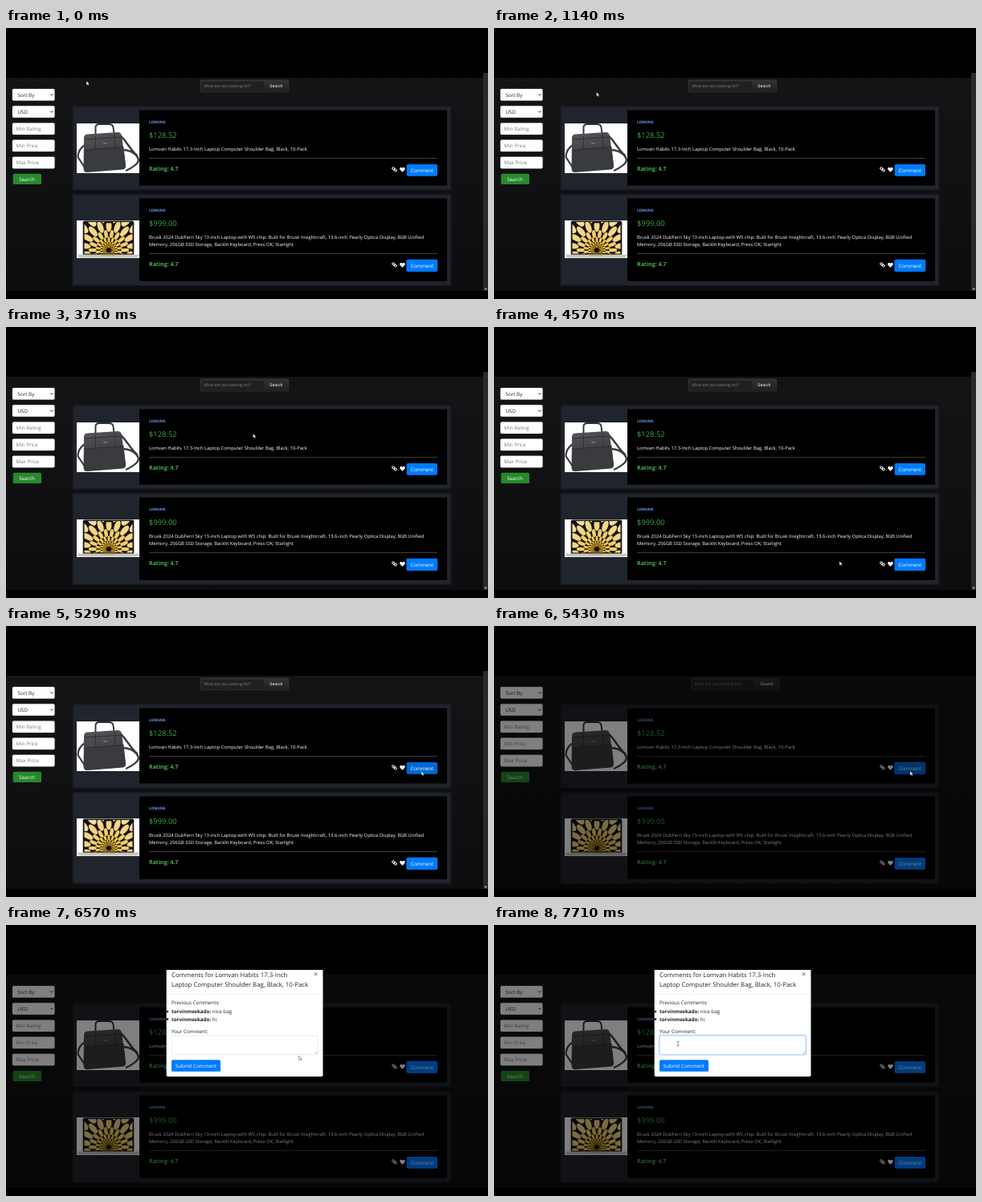
Write an HTML page that moves like this. It is 600 px wide and 338 px high and loops after 8000 ms.

```html
<!DOCTYPE html>
<html lang="en">
<head>
<meta charset="utf-8">
<title>Product comments</title>
<style>
html, body { margin: 0; width: 100%; height: 100%; overflow: hidden; background: #000; }
svg { display: block; width: 100vw; height: 100vh; }
text { font: 6.25px "Open Sans", "Noto Sans", sans-serif; fill: #fff; white-space: pre; text-rendering: geometricPrecision; }
.b { font-weight: 700; }
.brand { font-size: 4.69px; font-weight: 700; fill: #6b9bf2; }
.price { font-size: 9.375px; fill: #3fa845; }
.desc { font-size: 5.86px; }
.rate { font-size: 7.03px; font-weight: 700; fill: #4caf50; }
.bar { font: 5.2px "Liberation Sans", Arial, sans-serif; }
.hint { fill: #757b82; }
.ink, #modal text { fill: #212529; }
#modal text.w { fill: #fff; }
#modal .title { font-size: 7.81px; }
</style>
</head>
<body>
<svg viewBox="0 0 600 338" preserveAspectRatio="none">
  <defs>
    <linearGradient id="page" x2="0" y2="1"><stop stop-color="#141416"/><stop offset="1" stop-color="#0d0d0f"/></linearGradient>
    <linearGradient id="tool" x2="0" y2="1"><stop stop-color="#333"/><stop offset="1" stop-color="#1f1f1f"/></linearGradient>
    <linearGradient id="cloth" x2=".3" y2="1"><stop stop-color="#55565a"/><stop offset="1" stop-color="#343538"/></linearGradient>
    <clipPath id="view"><rect y="56" width="600" height="272"/></clipPath>
    <clipPath id="screen"><rect x="97.5" y="242" width="60" height="39.5"/></clipPath>
  </defs>
  <rect width="600" height="338"/>
  <rect y="62" width="600" height="266" fill="url(#page)"/>
  <g id="search">
    <rect x="242" y="64.8" width="110" height="15.2" rx="1.5" fill="url(#tool)" stroke="#3b3b3b" stroke-width=".5"/>
    <rect x="244" y="66.7" width="77" height="11.4" fill="#202020"/>
    <text class="bar" x="246" y="74.2" fill-opacity=".42">What are you looking for?</text>
    <text class="bar" x="328" y="74.4">Search</text>
  </g>
  <g id="side"></g>
  <g id="cards"></g>
  <g id="scroll">
    <rect x="594" y="56" width="6" height="272" fill="#2a2a2b"/>
    <path d="M595.2 324.6h3.8l-1.9 2.4z" fill="#aaa"/>
  </g>
  <rect id="shade" y="56" width="600" height="272" opacity="0"/>
  <g clip-path="url(#view)"><g id="modal"></g></g>
  <path id="arrow" d="M0 0V5.3L1.3 4.2 2.2 6.1 3.1 5.7 2.3 3.9H3.9Z" fill="#fff" stroke="#000" stroke-width=".35"/>
  <path id="beam" d="M-1.3-2.7H1.3M0-2.7V2.7M-1.3 2.7H1.3" stroke="#444" stroke-width=".6"/>
</svg>
<script>
const $ = id => document.getElementById(id);
const box = (x, y, w, h, fill, rx = 0, more = '') =>
  `<rect x="${x}" y="${y}" width="${w}" height="${h}" rx="${rx}" fill="${fill}" ${more}/>`;
const txt = (x, y, s, cls = '') => `<text x="${x}" y="${y}" class="${cls}">${s}</text>`;
const line = (d, stroke, w) => `<path d="${d}" fill="none" stroke="${stroke}" stroke-width="${w}"/>`;

// Side filters
const field = (y, s, select) => box(8, y, 52.5, 14.5, '#fff', 1.6, 'stroke="#e4e7ea" stroke-width=".3"') +
  (select ? txt(14.5, y + 9.6, s, 'ink') + line(`M55.2 ${y + 6.4}l1.6 1.7 1.6-1.7`, '#222', .9)
          : txt(12.5, y + 9.5, s, 'hint'));
$('side').innerHTML = field(76, 'Sort By', true) + field(97.2, 'USD', true) +
  field(118.4, 'Min Rating') + field(139.6, 'Min Price') + field(160.7, 'Max Price') +
  box(8.7, 181.8, 35.3, 13.2, '#28882b', 1.6) + txt(16.2, 190.6, 'Search');

// Product pictures
const bag = box(88, 119, 78, 62, '#fff') +
  line('M143 135C150 141 154 151 164 160M147 152C158 153 169 162 163 169Q158 174 149 178', '#3c3d40', 2.4) +
  line('M98 146C92 150 89.5 155 89.5 161L98 174', '#3c3d40', 2.2) +
  line('M111.5 137V124Q111.5 120 116 120H128Q133 120 133.5 124L135 136', '#303134', 1.9) +
  '<path d="M97 137Q97 133 101 132.5L139 130Q143 130 144 134L149 172Q149 176 145 176.5L101 180Q96.5 180 96.5 175Z" fill="url(#cloth)"/>' +
  '<path d="M98 152L146.5 148.5 149 172Q149 176 145 176L101 179.5Q97 179.5 97 175Z" fill="#3a3b3e"/>' +
  line('M98 139L144 136M98 152L146.5 148.5M111.5 134L111 152M135 132L136 150', '#28292c', .8) +
  box(121, 143, 5, 1.6, '#77787b');

// Overlapping rings of leaves, each ring turned by half a leaf
function petals() {
  let out = '';
  for (let ring = 0, r = 4; ring < 7; ring++, r *= 1.5) {
    for (let i = 0; i < 18; i++) {
      const a = (i + ring / 2) * 20;
      out += `<ellipse cx="${r}" rx="${r * .25}" ry="${r * .115}" fill="hsl(44 85% ${48 + ring * 5}%)" transform="translate(128 277) rotate(${a})"/>`;
    }
  }
  return out;
}
const laptop = box(88, 240, 78, 47, '#fff') + box(95.7, 240.6, 63.6, 43, '#17171a', 2) +
  `<g clip-path="url(#screen)">${box(97, 242, 61, 40, '#111')}${petals()}</g>` +
  box(122, 241.4, 11, 1.9, '#111', .8) +
  '<path d="M89 282.5H165.5V284Q164 286.5 160 286.5H94Q90 286.5 89 284Z" fill="#c9c5bb"/>' +
  box(119, 282.5, 16, 1.3, '#9d998f', .6);

// Cards
const heart = (x, y) => `<path transform="translate(${x} ${y})" d="M0 3.2L-2.9.2C-4.4-1.8-1.7-4.1 0-1.9 1.7-4.1 4.4-1.8 2.9.2Z" fill="#fff"/>`;
const chain = (x, y) => `<g transform="translate(${x} ${y}) rotate(40)" fill="none" stroke="#fff" stroke-width="1">` +
  '<rect x="-3.3" y="-1.2" width="3.6" height="2.4" rx="1.2"/><rect x="-.3" y="-1.2" width="3.6" height="2.4" rx="1.2"/></g>';
function card(y, h, picture, price, lines, id) {
  const rule = Math.round(y + h - 39.2);
  return box(82.5, y - 1.5, 472, h + 3, '#191b20', 2) + box(84, y, 469, h, '#20242d', 1.5) + picture +
    box(166, y + 4, 383, h - 8.5, '#000') +
    txt(178, y + 20.8, 'LOMVAN', 'brand') + txt(178, y + 38.7, price, 'price') +
    lines.map((s, i) => txt(178, y + 54.2 + i * 8.8, s, 'desc')).join('') +
    box(178, rule, 359, .6, '#666') + txt(178, rule + 15.8, 'Rating: 4.7', 'rate') +
    chain(483.5, rule + 14.4) + heart(493.5, rule + 14.6) +
    box(498.7, rule + 8, 38.3, 14.7, '#007bff', 1.6, `id="${id}"`) + txt(503.4, rule + 17.7, 'Comment');
}
$('cards').innerHTML =
  card(98.5, 102.5, bag, '$128.52', ['Lomvan Habits 17.3-Inch Laptop Computer Shoulder Bag, Black, 10-Pack'], 'first') +
  card(208.5, 111.7, laptop, '$999.00', [
    'Brusk 2024 DubFern Sky 13-inch Laptop with W5 chip: Built for Brusk Insightcraft, 13.6-inch Pearly Optica Display, 8GB Unified',
    'Memory, 256GB SSD Storage, Backlit Keyboard, Press OK; Starlight'], 'second');

// Comment dialog
const remark = (y, s) => `<circle cx="201" cy="${y - 2.1}" r="1.2"/>` +
  `<text x="206" y="${y}"><tspan class="b">torvinmeskado:</tspan> ${s}</text>`;
$('modal').innerHTML = box(199.7, 50, 194.8, 139, '#fff', 1.8) +
  txt(206, 64.8, 'Comments for Lomvan Habits 17.3-Inch', 'title') +
  txt(206, 76.7, 'Laptop Computer Shoulder Bag, Black, 10-Pack', 'title') +
  line('M383.8 59.5l3.4 3.4m0-3.4l-3.4 3.4', '#444', .9) +
  box(199.7, 86.3, 194.8, .4, '#dee2e6') +
  txt(206, 98.6, 'Previous Comments:') + remark(110.1, 'nice bag') + remark(119.6, 'hi') +
  txt(206, 135.2, 'Your Comment:') +
  box(205.6, 137.4, 183, 24.6, 'none', 2, 'id="ring" stroke="#007bff" stroke-opacity=".25" stroke-width="1.3"') +
  box(206.2, 138, 181.8, 23.4, '#fff', 1.6, 'id="area" stroke-width=".5"') +
  line('M384.3 160.6l3-3M386 160.6l1.3-1.3', '#777', .4) +
  box(206, 168.2, 61, 14.6, '#007bff', 1.6) + txt(210.8, 177.9, 'Submit Comment', 'w');

// Pointer stops: step, x, y
const stops = [[0, 100, 66], [2, 127.5, 80], [17, 127.5, 80], [22, 235, 108], [25, 307, 133], [26, 307.5, 133],
  [29, 400, 310], [32, 430, 292], [34, 430, 292], [37, 517, 181], [38, 518, 181], [41, 503, 179],
  [43, 500, 178], [49, 229, 148], [56, 229, 148]];
const clamp = v => Math.max(0, Math.min(1, v));
function pointer(n) {
  const i = Math.max(1, stops.findIndex(s => s[0] >= n));
  const [t0, x0, y0] = stops[i - 1], [t1, x1, y1] = stops[i];
  const k = (n - t0) / (t1 - t0);
  return [x0 + (x1 - x0) * k, y0 + (y1 - y0) * k];
}
const set = (id, name, v) => $(id).setAttribute(name, v);

function draw(now) {
  const n = Math.floor((now % 8000 + 5) * 7 / 1000) % 56;
  const open = n >= 38, focus = n >= 50;
  const [x, y] = pointer(n);
  const over = n > 43 && x > 206 && x < 388 && y > 138 && y < 161;
  const slide = clamp((n - 38) / 2);
  set('search', 'transform', `translate(${open ? 3.3 : 0})`);
  set('scroll', 'opacity', open ? 0 : 1);
  set('shade', 'opacity', open ? .5 : 0);
  set('modal', 'opacity', clamp(n - 38));
  set('modal', 'transform', `translate(0 ${-19.5 * (1 - slide) ** 2})`);
  const hover = n >= 37 && n < 44;
  set('first', 'fill', hover ? '#0069d9' : '#007bff');
  for (const [id, on] of [['first', open && !focus], ['second', !open]]) {
    set(id, 'stroke', on ? 'rgba(0,123,255,.5)' : 'none');
    set(id, 'stroke-width', 1.3);
  }
  set('ring', 'opacity', focus ? 1 : 0);
  set('area', 'stroke', focus ? '#80bdff' : '#ced4da');
  set('arrow', 'transform', `translate(${x} ${y})`);
  set('beam', 'transform', `translate(${x} ${y})`);
  set('arrow', 'opacity', over ? 0 : 1);
  set('beam', 'opacity', over ? 1 : 0);
  requestAnimationFrame(tick);
}
const start = performance.now();
const tick = () => draw(performance.now() - start);
tick();
</script>
</body>
</html>
```
